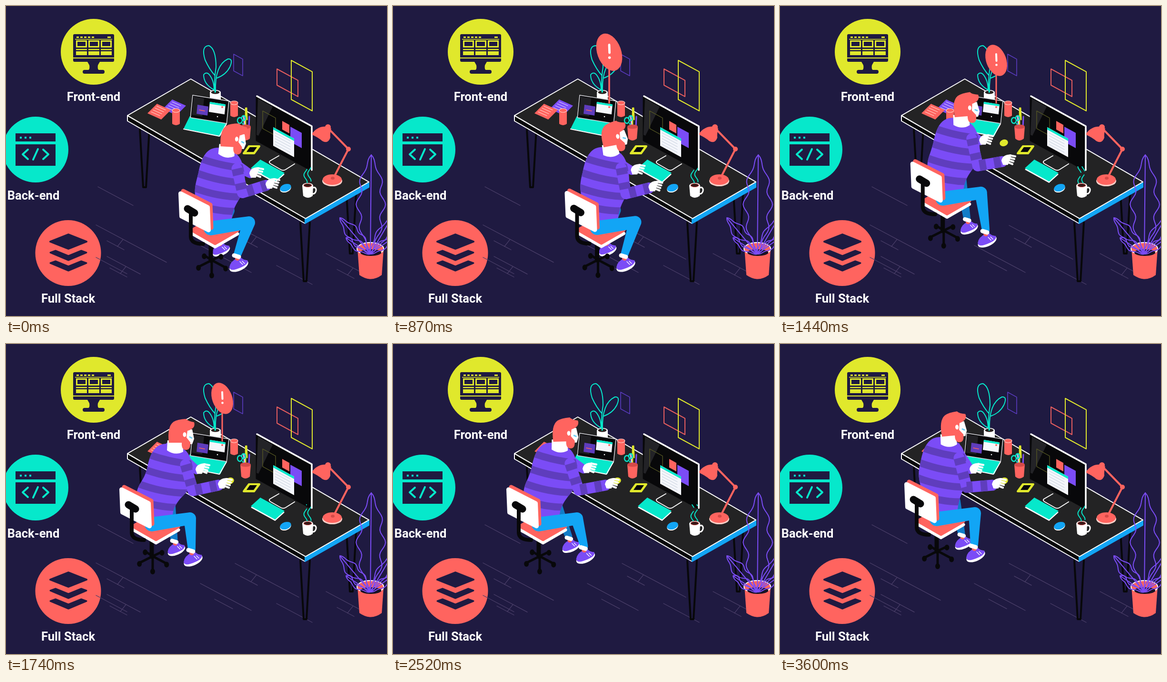
Animation of 800x650 px, one loop 3630 ms. Source, as an HTML page:

```html
<!DOCTYPE html>
<html lang="en">
<head>
<meta charset="utf-8">
<title>Developer at a desk</title>
<style>
html, body { margin: 0; width: 100%; height: 100%; overflow: hidden; background: #1f1a41; }
svg { display: block; width: 800px; height: 650px; }
text { font: bold 25.6px Roboto, sans-serif; fill: #fff; text-anchor: middle; }
</style>
</head>
<body>
<svg id="stage" viewBox="0 0 800 650"></svg>
<script>
const LOOP = 3630;
const C = { bg: '#1f1a41', yellow: '#e0e82c', teal: '#06e8cb', coral: '#ff645f', purple: '#7b4cf6', dark: '#5f3dbd',
  blue: '#12a5f5', deep: '#127cc8', white: '#fff', pink: '#ffd0c8', black: '#08080a', desk: '#232324' };

// ---- drawing helpers ----
const attrs = 'stroke-linecap="round" stroke-linejoin="round"';
const rim = (color, w = 2) => `stroke="${color}" stroke-width="${w}" ${attrs}`;
const path = (d, fill, extra = '') => `<path d="${d}" fill="${fill}" ${extra}/>`;
const line = (d, color, w = 2, extra = '') => path(d, 'none', `${rim(color, w)} ${extra}`);
const oval = (x, y, rx, ry, fill, extra = '') =>
  `<ellipse cx="${x}" cy="${y}" rx="${rx}" ry="${ry}" fill="${fill}" ${extra}/>`;
const tilted = (x, y, rx, ry, fill, deg) => oval(x, y, rx, ry, fill, `transform="rotate(${deg} ${x} ${y})"`);
const rect = (x, y, w, h, fill, r = 0) => `<rect x="${x}" y="${y}" width="${w}" height="${h}" rx="${r}" fill="${fill}"/>`;
const repeat = (n, f) => Array.from({ length: n }, (_, i) => f(i)).join('');

// Parallelogram from a corner and two edges
const quad = (x, y, ax, ay, bx, by, fill, extra) => path(`M${x} ${y}l${ax} ${ay}l${bx} ${by}l${-ax} ${-ay}Z`, fill, extra);
const SLOPE = .577;
const flat = (x, y, a, b, fill, extra) => quad(x, y, a, a * SLOPE, -b, b * SLOPE, fill, extra);
const wall = (x, y, w, h, fill, extra) => quad(x, y, w, w * .545, 0, h, fill, extra);
const lid = (x, y, w, h, fill, extra) => quad(x, y, w, w * .16, -h * .1, h, fill, extra);

function badge(x, y, color, label, baseline, icon) {
  return oval(x, y, 69, 69, color) + icon + `<text x="${x}" y="${baseline}">${label}</text>`;
}

function badges() {
  const k = C.bg, y = C.yellow;
  const screen = rect(141, 59, 86, 58, k, 3) + rect(145, 69, 78, 1.5, y) + rect(141, 108, 86, 2, y) +
    repeat(5, i => rect(148 + i * 8, 64, 5, 3, y)) + rect(213, 64, 7, 3, y) +
    repeat(3, i => {
      const x = 147 + i * 26;
      return rect(x, 72, 23, 15, y) + rect(x + 3, 75, 17, 9, k) + rect(x, 90, 23, 2.5, y) + rect(x, 95, 23, 8, y);
    }) + path('M171 117H197L193 124Q191 134 197 135H171Q177 134 175 124Z', k) + rect(161, 134, 46, 8, k, 4);
  const code = rect(20, 267, 84, 17, k) + rect(20, 290, 84, 45, k) +
    repeat(3, i => rect(29 + i * 10, 274, 4, 4, C.teal)) +
    line('M46 301L35 311L46 321M78 301L89 311L78 321M67 300L57 322', C.teal, 4);
  const layers = path('M131 479L169 494L131 509L93 494Z', k, rim(k, 4)) +
    repeat(2, i => path(`M93 ${517 + i * 22}l11 -4l27 11l27 -11l11 4l-38 16Z`, k, rim(k, 3)));
  return badge(184, 96, y, 'Front-end', 199, screen) + badge(62, 301, C.teal, '', 0, code) +
    '<text x="57.5" y="406">Back-end</text>' + badge(130.5, 518, C.coral, 'Full Stack', 622, layers);
}

// A floorboard seam, with an optional cross joint
const seam = (x, y, len, joint) => line(`M${x} ${y}l${len} ${len * .53}` +
  (joint ? `m${joint - len} ${(joint - len) * .53}l-12 15m-22 -12l36 19` : ''), '#4b3f69', 1.3);

function room() {
  return seam(193, 379, 74) + seam(189, 459, 148, 57) + seam(189, 527, 65) + seam(212, 525, 70, 40) +
    seam(481, 460, 134, 45) + seam(408, 502, 107) + seam(438, 535, 38) + seam(568, 544, 75) + seam(672, 519, 96, 57) +
    wall(478, 101, 19, 35, 'none', rim('#5a3bc0', 1.6)) +
    wall(569, 132, 44, 34, 'none', rim('#e55d5e')) + wall(599, 114, 44, 82, 'none', rim(C.yellow));
}

function desk() {
  const leg = (x, top, h) => line(`M${x - 10} ${top}l7 ${h}h6l7 ${-h}`, C.black, 4);
  return leg(291, 258, 122) + leg(725, 394, 125) + leg(628, 454, 123) +
    quad(255, 230, 373, 215, 0, 11, C.black, rim(C.white)) +
    quad(628, 446, 134, -76, 0, 10, C.blue, rim(C.blue)) +
    flat(388, 153, 374, 133, C.desk, rim(C.white));
}

// Leaf outline around a straight rib; waves ripple its edge
function leaf(x0, y0, x1, y1, width, waves, color) {
  const len = Math.hypot(x1 - x0, y1 - y0), nx = (y1 - y0) / len, ny = (x0 - x1) / len;
  const edge = side => repeat(41, i => {
    const u = i / 40, w = side * width * Math.sin(Math.PI * u) ** .8 * (.85 + .18 * Math.cos(2 * Math.PI * waves * u));
    return `${i ? 'L' : 'M'}${(x0 + (x1 - x0) * u + nx * w).toFixed(1)} ${(y0 + (y1 - y0) * u + ny * w).toFixed(1)}`;
  });
  return line(edge(1) + edge(-1) + (waves ? `M${x0} ${y0}L${x1} ${y1}` : ''), color, 2);
}

function plant() {
  const grow = (x, y, w, n) => leaf(765, 520, x, y, w, n, C.purple);
  return path('M738 508L742 564Q766 581 789 564L793 508Z', C.coral) +
    oval(765, 509, 28, 13, C.coral, rim(C.white)) + oval(766, 517, 22, 7, '#191325') +
    grow(767, 312, 30, 4) + grow(701, 444, 15, 3) + grow(714, 486, 11, 2) + grow(812, 440, 12, 2) + grow(815, 484, 9, 2);
}

const can = (x, y, h) => path(`M${x - 8} ${y}v${h}q8 6 16 0v${-h}Z`, C.coral) + oval(x, y, 8, 4, C.coral, rim(C.pink, 1.2));

function papers() {
  const sheet = (x, y, color, ink) => quad(x, y, 29, 13, -20, 20, color) +
    repeat(4, i => line(`M${x - i * 4} ${y + 5 + i * 4}l18 8`, ink, 1.2));
  return sheet(349, 196, C.purple, '#d8ccff') + sheet(317, 205, C.coral, C.pink) + can(357, 219, 28);
}

function laptop() {
  const loop = (x, y, dx, dy, w) => line(`M${x} ${y}c${dx - w} ${dy * .6} ${dx - w} ${dy * 1.2} ${dx} ${dy}` +
    `c${w * 1.2} ${-dy * .1} ${w - dx} ${-dy * .5} ${-dx} ${-dy}`, C.teal);
  return path('M428 181v15q11 9 23 0v-15Z', C.white) + oval(439.5, 181, 11.5, 5, C.white) + oval(439.5, 181, 9, 3.5, '#2a211f') +
    line('M439 181Q436 160 441 128Q441 90 426 83Q409 84 418 113Q427 133 439 146M440 180Q438 124 466 111Q478 110 470 128Q462 144 443 151' +
      'M437 176Q415 164 415 144Q423 134 432 152Q437 162 437 176', C.teal) +
    quad(386, 231, 77, 16, -13, 26, C.teal) + line('M373 258l75 15l15 -26', C.white) +
    lid(392, 187, 76, 47, C.black, rim('#d8d8de', 1.5)) + lid(394, 190, 22, 38, '#202024') +
    lid(402, 207, 23, 19, C.dark) + line('M406 218l11 2', C.coral, 1.5) +
    lid(428, 201, 33, 21, '#f4f6fb') + lid(428, 201, 33, 4, C.teal) +
    oval(454, 212, 2, 2, C.coral) + oval(444, 232, 1.3, 1.3, C.white) + can(479, 203, 27);
}

function monitor() {
  return line('M573 314L554 325Q551 328 556 331L577 343Q582 346 587 343L606 331', C.white) +
    wall(526, 190, 116, 92, C.black, rim(C.black, 3)) + line('M527 189L642 252V344', C.white, 3.5) +
    path('M529 194l31 17l-30 61l-4 -2Z', '#232327') + wall(539, 220, 27, 37, 'none', rim('#5c5e25', 1.2)) +
    wall(580, 241, 15, 18, C.coral) + wall(597, 253, 24, 32, C.purple) +
    wall(561, 254, 44, 39, '#f4f6fb') + wall(561, 254, 44, 5, C.teal) +
    repeat(5, i => line(`M565 ${266 + i * 6}l32 17`, '#c3cddb', 1));
}

function desktopItems() {
  const pens = repeat(3, i => line(`M${499 + i * 6} ${232 - i % 2 * 18}l${3 - i * 2} 24`, ['#c9c4ff', C.yellow, C.purple][i], 3));
  const cup = pens + line('M503 214v40', C.yellow, 2.5) + line('M497 246l4 10M491 234a5 6 0 1 0 .1 0M499 230a4 5 0 1 0 .1 0', C.teal, 2.4) +
    path('M492 253l2 25q9 8 18 0l2 -25Z', C.coral) + oval(503, 253, 11, 4.5, '#d54a49');
  const phone = quad(510, 294, 22, 0, -11, 15, C.yellow, rim(C.yellow, 4)) + quad(512, 296, 15, 0, -7, 10, C.black);
  const keys = [3, 0].map(d => quad(534, 322 + d, 51, 28, -20, 18, d ? C.white : C.teal)).join('');
  const mouse = [2, 0].map(d => tilted(587, 381 + d, 12, 7.5, d ? C.white : C.blue, -18)).join('');
  const mug = line('M644 381c10 -4 9 13 0 13', C.white, 3) + path('M622 376l2 22q10 8 20 0l1 -22Z', C.white) +
    oval(633.5, 376, 11, 5, C.white) + oval(633.5, 376, 8.5, 3.6, '#3a1717', rim('#d9534f', 1));
  const lamp = oval(685, 367, 21, 11, C.pink) + oval(685, 364, 20, 11, C.coral) +
    line('M688 360L719 300L682 262', C.coral, 4) + oval(719, 300, 5, 5, C.coral) + oval(686, 361, 4, 3, '#d64a47') +
    oval(676, 254, 6, 6, C.coral) + path('M643 267Q655 251 674 253L683 257Q680 266 681 276Q676 290 664 283Q656 276 643 270Z', C.coral);
  return tilted(470, 287, 9, 7, C.yellow, -20) + cup + phone + keys + mouse + mug + lamp;
}

const sign = line('M0 0V-60', C.coral, 3) + tilted(0, -89, 21, 34, C.coral, -20) +
  line('M0 -102l.5 14', C.white, 4) + oval(.5, -79.5, 2.3, 2.3, C.white);

// ---- chair and person parts ----
const spokes = repeat(5, i => {
  const a = (20 + i * 72) * Math.PI / 180, x = 433 + 30 * Math.cos(a), y = 541 + 22 * Math.sin(a);
  return line(`M432 533L${x} ${y}`, C.black, 5) + oval(x, y + 2, 5, 6, C.black);
});
const chairBase = line('M430 498v36', C.black, 9) + spokes +
  [7, 0].map(d => flat(438, 443 + d, 48, 47, d ? C.white : C.coral, rim(d ? C.white : C.coral, 7))).join('');
const panel = (x, y, color) => quad(x, y, 57, 29, 2, 48, color, rim(color, 9));
const chairBack = panel(372, 388, C.coral) + panel(366.5, 393, C.white) +
  line('M381 425l15 9', C.black, 15) + line('M388 434v50q1 15 26 15', C.black, 8);

const shoe = tilted(0, 2, 21, 10, C.white, -24) +
  path('M-20 5Q-18 -8 -4 -14L5 -15Q10 -10 18 -10Q22 0 -6 9Q-18 13 -20 5Z', C.purple) +
  line('M2 -7l6 6M7 -8l5 5', C.white, 1.4) + oval(-3, -14, 5, 5, C.coral) + line('M-10 -20l10 3', C.white, 9);

const hand = path('M-14 3Q-9 -11 5 -9', C.white) + path('M-14 3Q-12 -9 5 -9L-2 11L-11 11Z', C.white, rim(C.white)) +
  repeat(4, i => line(`M${3 - i} ${-8 + i * 5}l${11 - i} ${2 + i * .4}`, C.white, 4.2));

const head = path('M-16 -15L-17 6Q0 18 17 9V-15Z', C.white) +
  path('M22 -38H36L40 -18L36 -7H30L20 -18Z', C.white) +
  path('M-13 -10Q-17 -44 -3 -54Q5 -59 23 -60Q27 -55 40 -53Q44 -40 26 -35L24 -21L32 -11Q33 6 22 5Q13 4 14 -10Z', C.coral) +
  oval(20, -27, 3.5, 5, C.white) + line('M31 -22l4 2', '#6fd0f5', 3);

const group = (id, content = '') => `<g id="${id}">${content}</g>`;
const stage = document.getElementById('stage');
stage.innerHTML = '<defs><clipPath id="clip"><path id="clipShape"/></clipPath></defs>' +
  badges() + room() + desk() + plant() + papers() + laptop() + monitor() + desktopItems() +
  line('', C.teal, 2, 'id="steamA"') + line('', C.teal, 2, 'id="steamB"') + group('sign', sign) +
  path('', C.deep, 'id="farLeg"') + group('farShoe', shoe) + group('base', chairBase) +
  path('', C.purple, 'id="farArm"') + group('farHand', hand) +
  path('', C.purple, 'id="torso"') + '<g clip-path="url(#clip)">' + line('', C.dark, 15, 'id="stripes"') + '</g>' +
  path('', C.blue, 'id="leg"') + group('shoe', shoe) + line('', C.purple, 23, 'id="arm"') +
  `<path id="cuffs" fill="none" stroke="${C.dark}" stroke-width="23" stroke-linejoin="round" stroke-dasharray="14 17"/>` +
  group('hand', hand) + group('head', head) + group('back', chairBack);

const el = {};
stage.querySelectorAll('[id]').forEach(n => el[n.id] = n);

// ---- motion helpers ----
const clamp = x => Math.max(0, Math.min(1, x));
const ease = (t, from, to) => { const u = clamp((t - from) / (to - from)); return u * u * (3 - 2 * u); };
const add = (p, x, y) => [p[0] + x, p[1] + y];
const mix = (p, q, u) => [p[0] + (q[0] - p[0]) * u, p[1] + (q[1] - p[1]) * u];
// Start point plus shifts, each scaled by its phase
const travel = (p, ...shifts) => shifts.reduce((a, [k, x, y]) => add(a, k * x, k * y), p);
const fmt = p => p.map(v => v.toFixed(2)).join(' ');
const setPath = (id, d) => el[id].setAttribute('d', d);
const move = (id, p, extra = '') => el[id].setAttribute('transform', `translate(${fmt(p)}) ${extra}`);
const chain = (...pts) => 'M' + pts.map(fmt).join('L');

// Tapered limb through joints given as [point, radius]
function limb(...joints) {
  return joints.map(([p, r], i) => {
    let d = `M${fmt(add(p, -r, 0))}a${r} ${r} 0 1 0 ${2 * r} 0a${r} ${r} 0 1 0 ${-2 * r} 0Z`;
    if (i) {
      const [q, s] = joints[i - 1], len = Math.hypot(p[0] - q[0], p[1] - q[1]);
      const nx = (q[1] - p[1]) / len, ny = (p[0] - q[0]) / len;
      d += chain(add(q, nx * s, ny * s), add(p, nx * r, ny * r), add(p, -nx * r, -ny * r), add(q, -nx * s, -ny * s)) + 'Z';
    }
    return d;
  }).join('');
}

function steam(id, x, phase) {
  setPath(id, 'M' + Array.from({ length: 18 }, (_, i) => {
    const y = 371 - i * 2;
    return fmt([x + 3.5 * Math.sin(y / 4.8 + phase), y]);
  }).join('L'));
  el[id].setAttribute('stroke-dasharray', '32 9');
  el[id].setAttribute('stroke-dashoffset', (-phase / (2 * Math.PI) * 41).toFixed(2));
}

function render(t) {
  const lift = ease(t, 60, 420), lean = ease(t, 700, 1220), roll = ease(t, 1130, 1620), slide = ease(t, 1230, 1620);
  const sink = ease(t, 2160, 2820), step = ease(t, 2290, 2680), pull = ease(t, 2760, 3240);
  const tap = Math.sin(t / 38) * 1.2 * (1 - lean + roll);

  const chair = travel([0, 0], [lean, -6, -3], [roll, -118, -85], [pull, 23, -11]);
  const nape = travel([463, 305], [lean, -23, -5], [roll, -85, -83], [sink, -9, -4], [pull, 8, -10]);
  const foot = travel([489, 543], [slide, -96, -91], [step, 18, -9]);
  const farFoot = travel([452, 512], [lean, -4, -2], [slide, -90, -79], [step, 25, -10], [pull, 3, -3]);
  const nearHand = travel([560, 371 - tap * (1 - lean)], [lean, -34, 20], [roll, -66, -100]);
  const farHand = travel([526, 348 + tap], [lean, -46, -24], [roll, -67, -65]);
  const seat = (x, y) => add(chair, x, y), neck = (x, y) => add(nape, x, y);

  move('base', chair);
  move('back', chair);
  move('head', nape, `rotate(${(3 - 12 * lift - 7 * lean + 16 * roll - 3 * sink - 2 * pull).toFixed(2)})`);

  const outline = `M${fmt(neck(-17, -8))}C${[neck(-40, -8), neck(-52, 8), neck(-59, 45)].map(fmt)}` +
    `C${[neck(-67, 75), seat(395, 385), seat(399, 412)].map(fmt)}L${fmt(seat(402, 455))}` +
    `Q${[seat(430, 474), seat(474, 446)].map(fmt)}C${[seat(478, 408), neck(43, 90), neck(39, 62)].map(fmt)}` +
    `C${[neck(38, 35), neck(32, 10), neck(16, 2)].map(fmt)}Z`;
  setPath('torso', outline);
  setPath('clipShape', outline);
  setPath('stripes', repeat(5, i => {
    const a = mix(neck(-75, 7), seat(390, 446), i / 4), b = mix(neck(52, 36), seat(488, 460), i / 4);
    return `M${fmt(a)}Q${fmt(add(mix(a, b, .5), 0, 12))} ${fmt(b)}`;
  }));

  const wrist = add(nearHand, -14, 5), shoulder = neck(22, 36);
  const arm = chain(shoulder, add(mix(shoulder, wrist, .5), -19, 33), wrist);
  setPath('arm', arm);
  setPath('cuffs', arm);
  move('hand', nearHand);
  setPath('farArm', limb([neck(24, 32), 12], [add(farHand, -13, 4), 9]));
  move('farHand', farHand);

  setPath('leg', limb([seat(430, 466), 15], [seat(510, 454), 13], [add(foot, -3, -22), 8]));
  setPath('farLeg', limb([seat(435, 452), 14], [seat(469, 429), 11], [add(farFoot, -5, -21), 7.5]));
  move('shoe', foot);
  move('farShoe', farFoot, 'scale(.93)');

  // the sign springs up past its full size, then settles
  const q = clamp((t - 640) / 400) - 1, pop = 1 + 3.6 * q ** 3 + 2.6 * q ** 2;
  move('sign', [454, 203], `scale(${Math.max(0, pop).toFixed(3)})`);
  el.sign.setAttribute('opacity', (t < 640 ? 0 : 1 - clamp((t - 2040) / 190)).toFixed(3));

  const phase = t / LOOP * 8 * Math.PI;
  steam('steamA', 629, phase);
  steam('steamB', 637, phase + .6);
}

const start = performance.now();
function tick(now) {
  render(Math.max(0, now - start) % LOOP);
  requestAnimationFrame(tick);
}
render(0);
requestAnimationFrame(tick);
</script>
</body>
</html>
```
